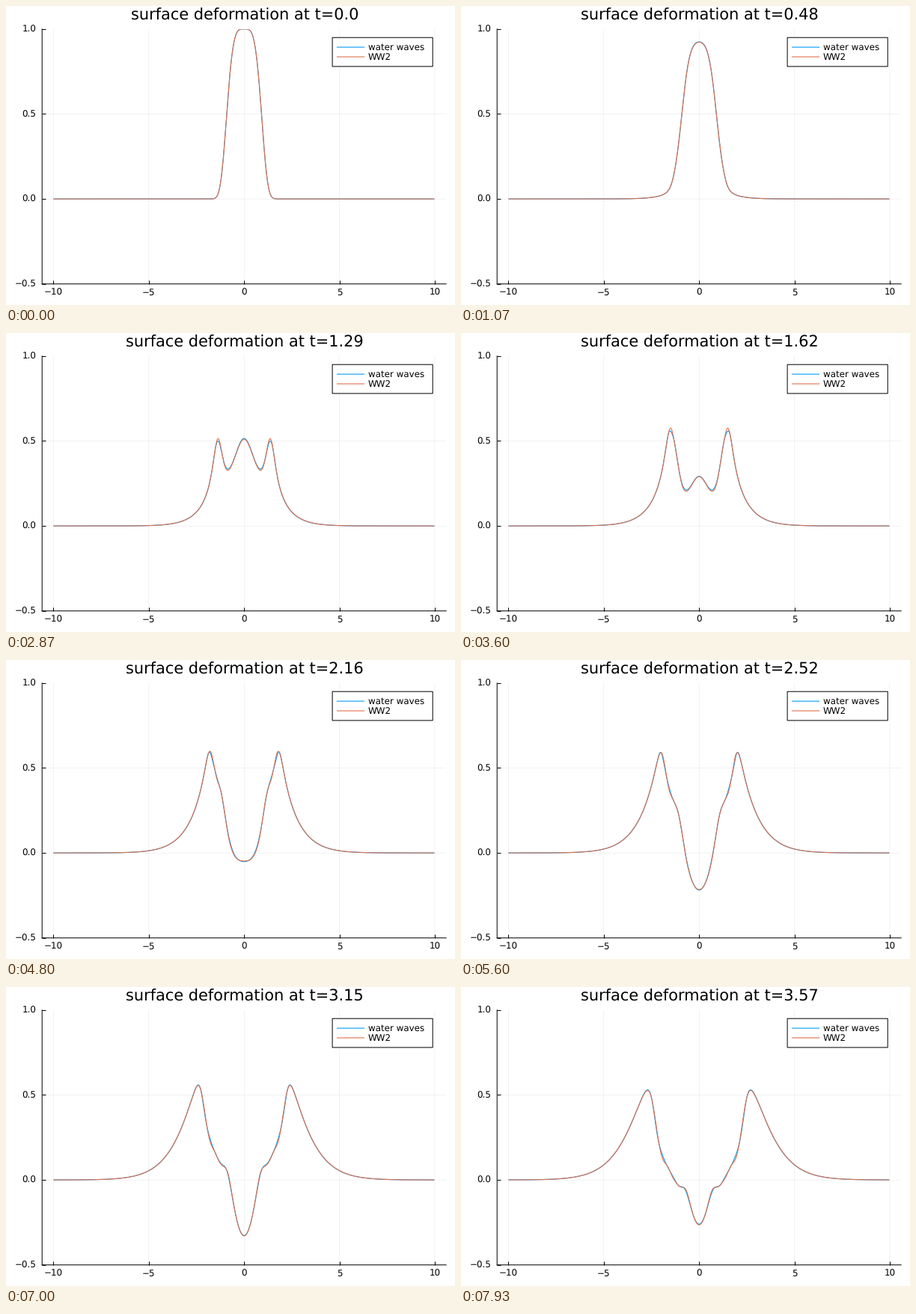
A matplotlib script for the animation above (8 s loop, 600 by 400 pixels).

```python
import numpy as np
import matplotlib.pyplot as plt
from matplotlib.animation import FuncAnimation
from matplotlib.lines import Line2D
from matplotlib.patches import Rectangle

# Dimensionless water waves in a periodic tank of unit depth
EPS = 0.25
HALF = 10.0
N = 1024
STATES = 120
DT = 0.03
SUBSTEPS = 3
RECT = 0.1

LOOP = 8000
TICK = 25

W, H, DPI = 600, 400, 100
PT = 72 / DPI
BLUE, ORANGE = "#009afa", "#e36f47"
SMALL, LARGE = 11.9 * PT, 20.83 * PT

xi = np.linspace(-HALF, HALF, N, endpoint=False)
k = np.pi / HALF * np.arange(N // 2 + 1)
dealias = (k < k[-1] * 2 / 3).astype(float)
lowpass = 1 / np.maximum(1, RECT * k)
L_FLAT = k * np.tanh(k)


def op(symbol, u):
    return np.fft.irfft(symbol * np.fft.rfft(u), N)


def dx(u):
    return op(1j * k * dealias, u)


def coth(y):
    c = np.zeros_like(k)
    c[1:] = 1 / np.tanh(k[1:] * (1 + y.mean()))
    return c


def map_x(y):
    return xi + op(-1j * coth(y), y)


def full_rate(state):
    """Full water waves in conformal variables."""
    y, phi = state
    c = coth(y)
    xs, ys, ps = 1 + op(k * c, y), dx(y), dx(phi)
    flux = op(k * np.tanh(k * (1 + y.mean())), phi)
    jac = xs**2 + ys**2
    q = flux / jac
    p = op(-1j * c, q)
    rate = p * ys + q * xs, -y + p * ps + (flux**2 - ps**2) / (2 * jac)
    return np.array([op(dealias, r) for r in rate])


def quad_rate(state):
    """Quadratic model with a rectifier on high wavenumbers."""
    y, phi = state
    flux, ps, yr = op(L_FLAT, phi), dx(phi), op(lowpass, y)
    rate_y = flux - dx(yr * ps) - op(L_FLAT * dealias, yr * flux)
    rate_p = -y - 0.5 * op(lowpass * dealias, ps**2 - flux**2)
    return np.array([rate_y, rate_p])


def solve(rate, y):
    state = np.array([y, np.zeros(N)])
    h = DT / SUBSTEPS
    out = [state[0]]
    for _ in range(STATES - 1):
        for _ in range(SUBSTEPS):
            a = rate(state)
            b = rate(state + h / 2 * a)
            c = rate(state + h / 2 * b)
            d = rate(state + h * c)
            state = state + h / 6 * (a + 2 * b + 2 * c + d)
        out.append(state[0])
    return out


def bump(x):
    return EPS * np.exp(-x**4)


x0 = xi.copy()
for _ in range(80):
    x0 = 0.5 * (x0 + map_x(bump(x0)))

full = solve(full_rate, bump(x0))
quad = solve(quad_rate, bump(xi))

plt.rcParams.update({"font.family": "DejaVu Sans", "text.hinting": "none"})
fig = plt.figure(figsize=(W / DPI, H / DPI), dpi=DPI, facecolor="white")


def put_text(x, y, text, size=SMALL, ha="left"):
    """Text with its baseline at pixel (x, y) from the top left."""
    return fig.text(x / W, 1 - y / H, text, size=size, ha=ha, va="baseline")


# Plot area in pixels
left, right, top, bottom = 48.2, 588.2, 30.8, 371.8
xlim, ylim = (-10.6, 10.6), (-0.5, 1)
xticks, yticks = (-10, -5, 0, 5, 10), (-0.5, 0.0, 0.5, 1.0)

ax = fig.add_axes([left / W, 1 - bottom / H,
                   (right - left) / W, (bottom - top) / H])
ax.set(xlim=xlim, ylim=ylim, xticks=xticks, yticks=yticks)
ax.spines[["top", "right"]].set_visible(False)
ax.tick_params(direction="in", length=5.4 * PT, width=PT,
               labelleft=False, labelbottom=False)
ax.grid(color="black", alpha=0.1, linewidth=0.5 * PT)
ax.set_axisbelow(True)
plt.setp(ax.get_xgridlines() + ax.get_ygridlines(), snap=False)
plt.setp([ax.spines["left"], ax.spines["bottom"]], linewidth=PT, snap=False)

for v in xticks:
    x = np.interp(v, xlim, (left, right))
    put_text(x, 387, str(v).replace("-", "\u2212"), ha="center")
for v in yticks:
    y = np.interp(v, ylim, (bottom, top))
    put_text(40.5, y + 4.1, str(v).replace("-", "\u2212"), ha="right")

line = dict(linewidth=1.1 * PT, solid_capstyle="butt", snap=False)
wave_full, = ax.plot([], [], color=BLUE, **line)
wave_quad, = ax.plot([], [], color=ORANGE, **line)

title = put_text(318.8, 19, "", LARGE, "center")

# Legend
fig.add_artist(Rectangle((436.1 / W, 1 - 80.9 / H), 134.1 / W, 38.7 / H,
                         facecolor="white", edgecolor="black",
                         linewidth=PT, snap=False))
for y, label, color in ((55.1, "water waves", BLUE), (68, "WW2", ORANGE)):
    fig.add_artist(Line2D([442 / W, 479 / W], [1 - y / H] * 2,
                          color=color, **line))
    put_text(484, y + 4.2, label)


def draw(i):
    # Show the state reached by the end of this tick
    n = ((i + 1) * TICK - 1) * STATES // LOOP
    wave_full.set_data(map_x(full[n]), full[n] / EPS)
    wave_quad.set_data(xi, quad[n] / EPS)
    title.set_text(f"surface deformation at t={round(DT * n, 2)}")
    return wave_full, wave_quad, title


anim = FuncAnimation(fig, draw, frames=LOOP // TICK, interval=TICK,
                     repeat=True, repeat_delay=0)
plt.show()
```
